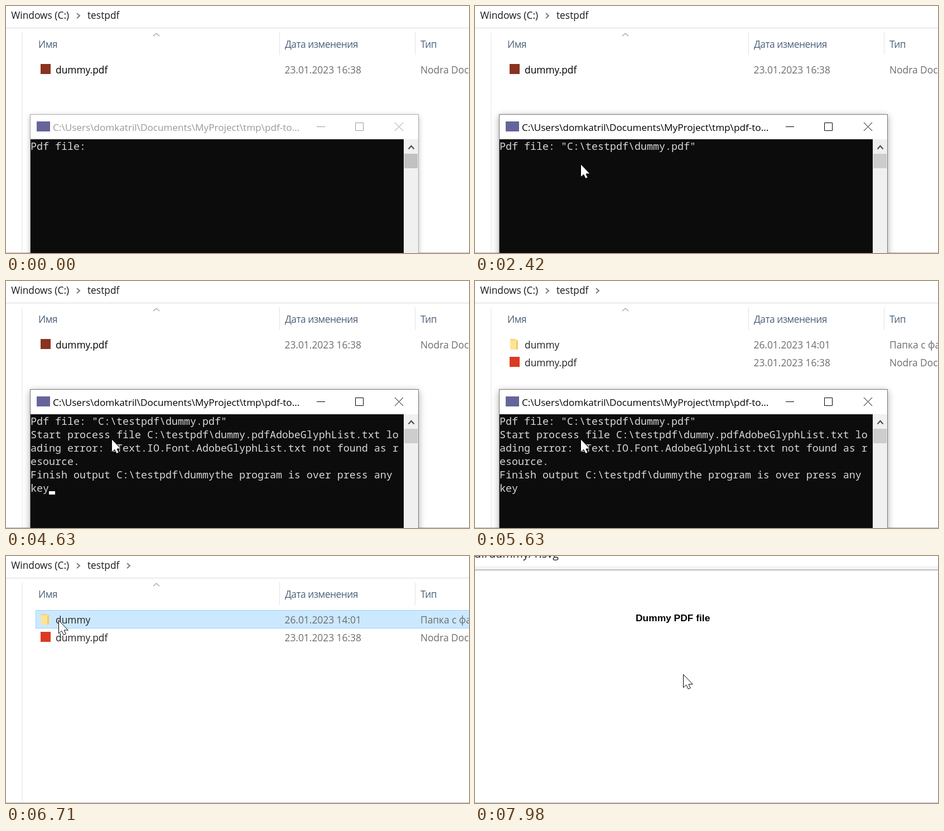
An HTML page with a canvas for the animation above (8000 ms loop, 830x443 px).

```html
<!DOCTYPE html>
<html lang="ru">
<head>
<meta charset="utf-8">
<title>PDF to SVG</title>
<style>
html, body { margin: 0; width: 830px; height: 443px; overflow: hidden; background: #fff; }
canvas { display: block; }
</style>
</head>
<body>
<canvas id="stage" width="830" height="443"></canvas>
<script>
const ctx = document.getElementById('stage').getContext('2d');
const LOOP = 8000, TICK = 67;
const UI = '"Open Sans", sans-serif';
const MONO = '500 18.333px "Noto Sans Mono", monospace';

const consoleLines = [
  String.raw`Pdf file: "C:\testpdf\dummy.pdf"`,
  String.raw`Start process file C:\testpdf\dummy.pdfAdobeGlyphList.txt lo`,
  'ading error: iText.IO.Font.AdobeGlyphList.txt not found as r',
  'esource.',
  String.raw`Finish output C:\testpdf\dummythe program is over press any `,
  'key'
];
// time, caret row, caret column
const output = [[0, 0, 10], [2290, 0, 32], [4080, 1, 0], [4150, 1, 39], [4420, 4, 0], [4630, 5, 3]];
// time, x, y
const pointerPath = [
  [130, 329, 393], [470, 225, 300], [670, 190, 264], [804, 189, 283],
  [6030, 189, 283], [6298, 103, 148], [6432, 94, 115],
  [7370, 94, 115], [7705, 289, 189], [7970, 373, 212]
];
const clicks = [[1070, 1340], [1820, 1960], [6500, 6570], [6640, 6710], [6980, 7040], [7110, 7240]];
const caretOn = [[1070, 1360], [1890, 2420], [2950, 3480], [4010, 5560]];

const within = (t, spans) => spans.some(([a, b]) => t >= a && t < b);

function rect(x, y, w, h, color) {
  ctx.fillStyle = color;
  ctx.fillRect(x, y, w, h);
}

function text(str, x, y, color, font = `17.35px ${UI}`) {
  ctx.font = font;
  ctx.fillStyle = color;
  ctx.fillText(str, x, y);
}

function line(d, color, width = 1) {
  ctx.strokeStyle = color;
  ctx.lineWidth = width;
  ctx.stroke(new Path2D(d));
}

function disc(x, y, r, color) {
  ctx.fillStyle = color;
  ctx.beginPath();
  ctx.arc(x, y, r, 0, 7);
  ctx.fill();
}

function crumb(x) {
  line(`M${x} 13l5 4.5l-5 4.5`, '#7a7a7a', 2);
}

function header() {
  ctx.letterSpacing = '-0.5px';
  text('Имя', 58, 75, '#4c607a');
  text('Дата изменения', 500, 75, '#4c607a');
  text('Тип', 743, 75, '#4c607a');
  ctx.letterSpacing = '0px';
}

function folderIcon(y) {
  rect(63, y - 11, 10, 19, '#f3cf73');
  rect(63, y - 9, 14, 17, '#ffe394');
  rect(74, y - 9, 3, 17, '#f0cb68');
}

function fileRow(y, icon, name, date, type, nameColor = '#222') {
  icon(y);
  text(name, 89, y + 6, nameColor);
  text(date, 499.5, y + 6, '#6d6d6d');
  text(type, 743, y + 6, '#6d6d6d');
}

function highlight(y, selected) {
  rect(53, y, 777, 33, selected ? '#99d1ff' : '#e5f3ff');
  if (selected) rect(54, y + 1, 776, 31, '#cce8ff');
}

function drawExplorer(t) {
  const inside = t >= 6780;
  text('Windows (C:)', 9.2, 23, '#1a1a1a');
  crumb(127);
  text('testpdf', 146, 23, '#1a1a1a');
  if (t >= 5360) crumb(217);
  if (inside) text('dummy', 236, 23, '#1a1a1a');

  rect(0, 39, 830, 1, '#d9d9d9');
  rect(28, 47, 2, 395, '#f2f2f2');
  rect(490, 47, 1, 41, '#e2e2e2');
  rect(733, 47, 1, 41, '#e2e2e2');
  line('M264 54l5.5 -5l5.5 5', '#666');
  header();

  if (within(t, [[6220, 6370]])) highlight(129, false);
  if (t >= 6370) highlight(97, within(t, [[6500, 6780], [6910, LOOP]]));

  const pdfIcon = color => y => rect(62, y - 11, 18, 18, color);
  const pdfRow = (y, iconColor, nameColor) =>
    fileRow(y, pdfIcon(iconColor), 'dummy.pdf', '23.01.2023 16:38', 'Nodra Docu', nameColor);
  if (inside) {
    fileRow(115, y => disc(71, y - 2, 12, '#1c86c6'), '1.svg', '26.01.2023 14:01', 'Tervolant B');
  } else {
    if (t < 5560) pdfRow(115, '#8a3320', '#000');
    else fileRow(115, folderIcon, 'dummy', '26.01.2023 14:01', 'Папка с файлами');
    if (t >= 5090) pdfRow(147, '#dc3a22');
  }
}

function drawConsole(t) {
  const active = t >= 1070;
  const ink = active ? '#000' : '#999';
  ctx.save();
  ctx.shadowColor = active ? 'rgba(0,0,0,.33)' : 'rgba(0,0,0,.25)';
  ctx.shadowBlur = active ? 12 : 9;
  ctx.shadowOffsetY = 3;
  rect(43, 194, 697, 260, active ? '#777' : '#aaa');
  ctx.restore();
  rect(44, 195, 695, 44, '#fff');
  rect(44, 239, 669, 204, '#0c0c0c');
  rect(713, 239, 26, 204, '#f0f0f0');
  rect(714, 265, 24, 26, active ? '#cdcdcd' : '#c1c1c1');
  line('M721.5 256.5l5 -5.5l5 5.5', '#505050', 2.2);

  rect(55, 207, 24, 18, '#65659a');
  text(String.raw`C:\Users\domkatril\Documents\MyProject\tmp\pdf-to...`, 84, 224, ink, `17.17px ${UI}`);
  line('M557 216.5h15M626.5 209.5h14v14h-14zM697 209l15 15m0 -15l-15 15', ink);

  const [, row, col] = output.findLast(step => t >= step[0]);
  consoleLines.slice(0, row + 1).forEach((str, i) =>
    text(i < row ? str : str.slice(0, col), 44, 258 + 24 * i, '#d8d8d8', MONO));
  if (within(t, caretOn)) rect(44 + 11 * col, 257 + 24 * row, 11, 6, '#fff');
}

function drawBrowser() {
  ctx.textAlign = 'right';
  text('C:/testpdf/dummy/1.svg', 150, 3, '#222', `19.8px ${UI}`);
  ctx.textAlign = 'left';
  rect(0, 18, 830, 6, '#f4f4f4');
  rect(0, 24, 830, 2, '#bcbcbc');
  text('Dummy PDF file', 288, 117, '#000', 'bold 17.4px "Liberation Sans", Arial, sans-serif');
}

function pointerAt(t) {
  const next = pointerPath.findIndex(key => key[0] > t);
  if (next < 1) return pointerPath.at(next).slice(1);
  const [t0, x0, y0] = pointerPath[next - 1];
  const [t1, x1, y1] = pointerPath[next];
  const k = (t - t0) / (t1 - t0);
  return [x0 + (x1 - x0) * k, y0 + (y1 - y0) * k];
}

function drawPointer(t) {
  const [x, y] = pointerAt(Math.floor((t + 4) / TICK) * TICK);
  if (within(t, clicks)) disc(x, y, 18, 'rgba(240,240,50,.6)');
  ctx.save();
  ctx.translate(Math.round(x), Math.round(y));
  const arrow = 'M.5 .5V24L5.7 19.2L9.2 26.5L13.2 24.8L10 18H17.3Z';
  ctx.fillStyle = '#fff';
  ctx.fill(new Path2D(arrow));
  line(arrow, '#000');
  ctx.restore();
}

function draw(t) {
  rect(0, 0, 830, 443, '#fff');
  if (t < 7450) drawExplorer(t);
  else drawBrowser();
  rect(0, 442, 830, 1, '#b8b8b8');
  if (t < 5760) drawConsole(t);
  if (t >= 130) drawPointer(t);
}

const start = performance.now();
function tick() {
  draw((performance.now() - start) % LOOP);
  requestAnimationFrame(tick);
}
tick();
</script>
</body>
</html>
```
